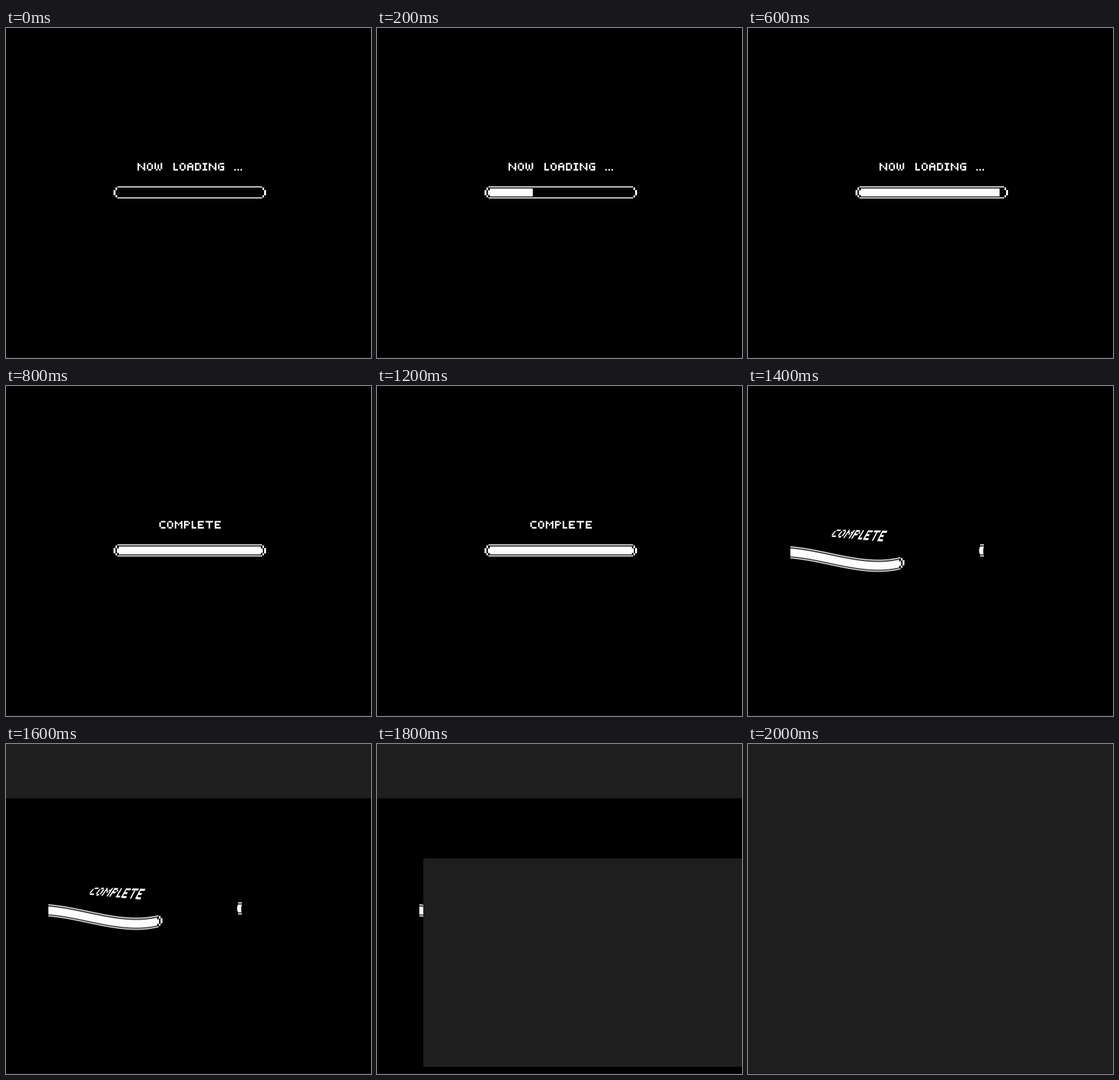
An HTML page with a canvas for the animation above (2200 ms loop, 560x505 px).

```html
<!DOCTYPE html>
<html lang="en">
<head>
<meta charset="utf-8">
<title>Now loading</title>
<style>
  html, body { margin: 0; width: 100%; height: 100%; overflow: hidden; background: #000; }
  canvas { display: block; }
</style>
</head>
<body>
<canvas id="stage" width="560" height="505" role="img" aria-label="NOW LOADING ... COMPLETE"></canvas>
<script>
const W = 560, H = 505, STEP = 200, LOOP = 2200;
const WHITE = '#fdfdfd', GRAY = '#1e1e1e', BLACK = '#000';
const ctx = document.getElementById('stage').getContext('2d');

// Pixel letters: width, then strokes as x0 y0 x1 y1 on a five-row grid.
const GLYPHS = {
  A: '4 1020 0104 3134 0232',
  C: '4 1030 0103 1434',
  D: '4 0020 0004 3133 0424',
  E: '4 0030 0004 0222 0434',
  G: '4 1030 0103 1434 3233 2232',
  I: '3 0020 1014 0424',
  L: '3 0004 0424',
  M: '5 0004 4044 1111 2222 3131',
  N: '5 0004 4044 1111 2222 3333',
  O: '4 1020 0103 3133 1424',
  P: '4 0020 0004 3131 0222',
  T: '5 0040 2024',
  W: '5 0003 4043 2123 1414 3434',
  '.': '1 0404'
};

function rect(c, color, x0, y0, x1, y1) {
  c.fillStyle = color;
  c.fillRect(x0, y0, x1 - x0, y1 - y0);
}

// Draws a word through a mapping from grid cells to stage points.
function word(text, map) {
  let left = 0;
  ctx.fillStyle = WHITE;
  ctx.beginPath();
  for (const ch of text) {
    const [width, ...strokes] = GLYPHS[ch].split(' ');
    for (const s of strokes) {
      const [a, b, c, d] = [...s].map(Number);
      const x0 = left + a, x1 = left + c + 1, y0 = b, y1 = d + 1;
      ctx.moveTo(...map(x0, y0));
      ctx.lineTo(...map(x1, y0));
      ctx.lineTo(...map(x1, y1));
      ctx.lineTo(...map(x0, y1));
      ctx.closePath();
    }
    left += +width + 1;
  }
  ctx.fill();
}

const flat = x => (u, v) => [x + u * 2.36, 206.4 + v * 2.36];

// Slanted word that grows taller to the right.
function slanted(u, v) {
  const s = u / 40, q = v / 5;
  const top = [135 + 79 * s, 219.6 + 1.8 * s];
  const low = [126 + 80 * s, 230.5 + 7.5 * s];
  return [top[0] + (low[0] - top[0]) * q, top[1] + (low[1] - top[1]) * q];
}

function bar(c, end) {
  rect(c, WHITE, 171, 242.4, 393, 244);
  rect(c, WHITE, 171, 259.2, 393, 260.8);
  for (const [x, sx] of [[165, 1], [399, -1]]) {
    rect(c, WHITE, x, 248, x + 3 * sx, 256);
    rect(c, WHITE, x + 3 * sx, 244, x + 5.5 * sx, 248);
    rect(c, WHITE, x + 3 * sx, 256, x + 5.5 * sx, 259.2);
  }
  if (!end) return;
  rect(c, WHITE, 173, 245.5, Math.min(end, 391), 257.8);
  rect(c, WHITE, 170, 248.5, end, 255.5);
}

const full = document.createElement('canvas');
full.width = W;
full.height = H;
bar(full.getContext('2d'), 394);

function bend(x) {
  if (x > 200) return 23.5 - 0.0035 * (x - 200) ** 2;
  const t = (x - 65) / 135;
  return 3 + 20.5 * t * t * (3 - 2 * t) + 10.8 * t * (1 - t) ** 2;
}

function glitch() {
  for (let x = 65; x < 241; x++) {
    ctx.drawImage(full, x + 159, 238, 1, 28, x, 238 + bend(x), 1, 28);
  }
  word('COMPLETE', slanted);

  // Stray piece of the bar
  rect(ctx, WHITE, 356, 242.4, 362, 244);
  rect(ctx, WHITE, 356, 259.2, 362, 260.8);
  ctx.beginPath();
  ctx.moveTo(356, 245.5);
  ctx.quadraticCurveTo(353, 252, 356, 257.8);
  ctx.lineTo(361.5, 257.8);
  ctx.quadraticCurveTo(360, 252, 362, 245.5);
  ctx.fill();
}

function draw(step) {
  rect(ctx, BLACK, 0, 0, W, H);
  if (step < 7) {
    bar(ctx, [0, 239, 325, 386][step] ?? 394);
    if (step < 4) {
      word('NOW', flat(201.8));
      word('LOADING', flat(256.8));
      word('...', flat(350.3));
    } else if (step !== 5) {
      word('COMPLETE', flat(235.3));
    }
  } else {
    glitch();
  }
  if (step >= 8) rect(ctx, GRAY, 0, 0, W, 83);
  if (step >= 9) rect(ctx, GRAY, 71, 175, W, 494);
  if (step >= 10) rect(ctx, GRAY, 0, 83, W, H);
  rect(ctx, '#121212', 0, 504, W, H);
}

const start = performance.now();
function tick() {
  draw(Math.floor((performance.now() - start) % LOOP / STEP));
  requestAnimationFrame(tick);
}
tick();
</script>
</body>
</html>
```
